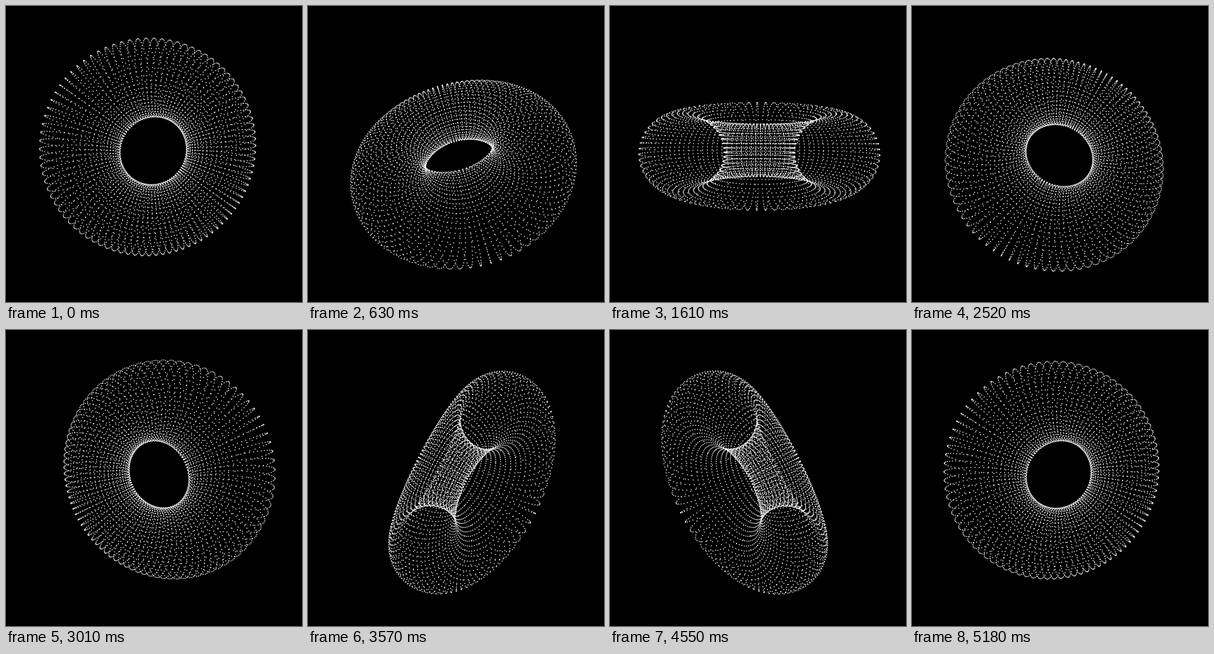
Recreate the animation shown at these times as an HTML page with a canvas. Size 423x423 px, loop 5.25 s.

```html
<!DOCTYPE html>
<html lang="en">
<head>
<meta charset="utf-8">
<title>Dotted torus</title>
<style>
html, body { margin: 0; width: 100%; height: 100%; overflow: hidden; background: #000; }
canvas { display: block; width: 423px; height: 423px; }
</style>
</head>
<body>
<canvas id="stage" width="423" height="423"></canvas>
<script>
const ctx = document.getElementById('stage').getContext('2d');
const SIZE = 423, STEP_MS = 70, STEPS = 75;
const RING = 2, TUBE = 1, DIST = 6, SCALE = 298.5;
const CX = 213.5, CY = 209;
const AROUND = 90, ACROSS = 50, DOT = 1.3;
const START = -100, TURN = 4.83; // degrees, degrees per step
const RAD = Math.PI / 180;

const points = [];
for (let i = 0; i < AROUND; i++) {
  const u = i / AROUND * 2 * Math.PI;
  for (let j = 0; j < ACROSS; j++) {
    const v = j / ACROSS * 2 * Math.PI;
    const r = RING + TUBE * Math.cos(v);
    points.push([r * Math.cos(u), TUBE * Math.sin(v), r * Math.sin(u)]);
  }
}

function spin(p, q, angle) {
  const c = Math.cos(angle), s = Math.sin(angle);
  return [p * c - q * s, p * s + q * c];
}

function draw(step) {
  const turn = (START + TURN * step) * RAD;
  const a = turn + Math.PI, b = turn + Math.PI / 2;
  ctx.fillStyle = '#000';
  ctx.fillRect(0, 0, SIZE, SIZE);
  ctx.fillStyle = '#fff';
  for (let [x, y, z] of points) {
    [y, z] = spin(y, z, a);
    [z, x] = spin(z, x, b);
    [x, y] = spin(x, y, a);
    const k = SCALE / (DIST + z);
    ctx.fillRect(CX + x * k - DOT / 2, CY + y * k - DOT / 2, DOT, DOT);
  }
}

let last = -1;
function tick() {
  const step = Math.floor(performance.now() / STEP_MS) % STEPS;
  if (step !== last) draw(last = step);
  requestAnimationFrame(tick);
}
tick();
</script>
</body>
</html>
```
